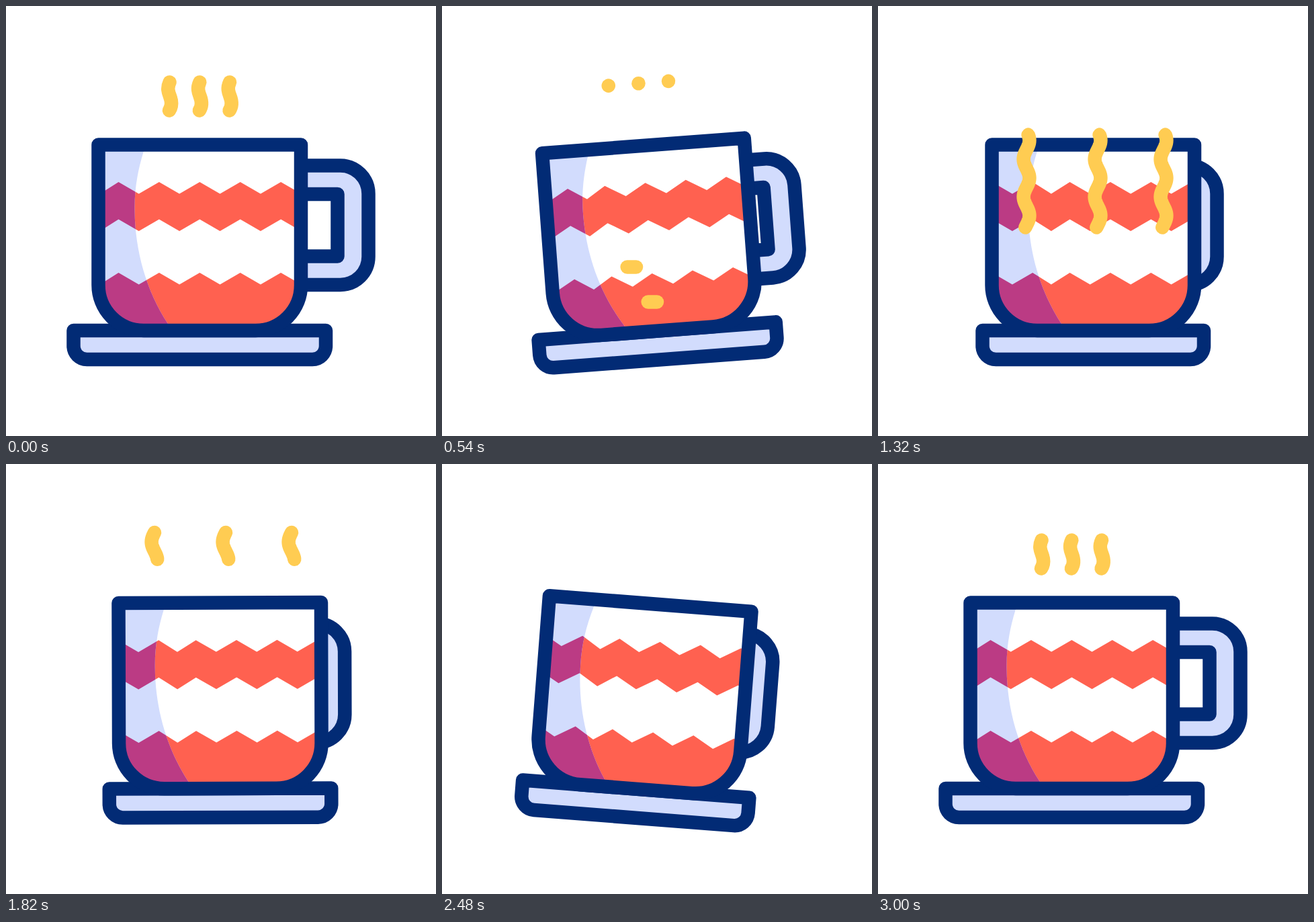
Write an HTML page that moves like this. It is 640 px wide and 640 px high and loops after 3400 ms.

```html
<!DOCTYPE html>
<html lang="en">
<head>
<meta charset="utf-8">
<title>Steaming cup</title>
<style>
  html, body { margin: 0; width: 100%; height: 100%; overflow: hidden; background: #fff; }
  svg { display: block; width: 100vw; height: 100vh; }
  .line { fill: none; stroke: #022b75; stroke-width: 20.5; stroke-linejoin: round; }
  .light { fill: #d2dcfd; }
  .glow { fill: none; stroke: #ffcc52; stroke-width: 20.5; stroke-linecap: round; }
</style>
</head>
<body>
<svg viewBox="0 0 640 640">
  <defs>
    <path id="cupShape" d="M137.5 206.5H439V415.5A67.5 67.5 0 0 1 371.5 483H205A67.5 67.5 0 0 1 137.5 415.5Z"/>
    <path id="shadeShape" d="M130 200H210L205 216C195 248 191 276 191.5 304C192 365 209 424 241 473L248 484H130Z"/>
    <path id="bands"/>
    <clipPath id="cupClip"><use href="#cupShape"/></clipPath>
    <clipPath id="shadeClip"><use href="#shadeShape"/></clipPath>
  </defs>
  <g id="cup">
    <path id="handle" class="line light" d="M420 237.5H497.5A42 42 0 0 1 539.5 279.5V373A42 42 0 0 1 497.5 415H420V372.5H493.5V280H420Z"/>
    <path id="saucer" class="line light"/>
    <use href="#cupShape" fill="#fff"/>
    <g clip-path="url(#cupClip)">
      <use class="band" href="#bands" fill="#ff6150"/>
      <use class="light" href="#shadeShape"/>
      <g clip-path="url(#shadeClip)"><use class="band" href="#bands" fill="#bb3b84"/></g>
    </g>
    <use href="#cupShape" class="line"/>
    <g id="puffs"></g>
  </g>
  <g id="streaks"></g>
  <g id="steam"></g>
</svg>
<script>
const LOOP = 3400;
const $ = id => document.getElementById(id);
const clamp = u => Math.min(1, Math.max(0, u));

// Smooth step from 0 to 1 between two times.
function ramp(t, from, to) {
  const u = clamp((t - from) / (to - from));
  return u * u * (3 - 2 * u);
}

// The second half starts with a lean back, then a lean forward.
const leanBack = t => ramp(t, 1775, 2160);
const leanForward = t => ramp(t, 2160, 2480);

const tilt = t =>
  4.3 * (ramp(t, 0, 260) - 2 * ramp(t, 260, 540) + ramp(t, 540, 900))
  - 4.05 * leanBack(t) + 8.5 * leanForward(t) - 4.45 * ramp(t, 2700, 3000);

const shift = t =>
  32 * ramp(t, 0, 900) - 42 * leanBack(t) + 22 * leanForward(t) - 12 * ramp(t, 2480, 3000);

// How far the cup is turned away: 0 to 1, a partial dip and rebound, then back to 0.
const turn = (t, start, dip, rebound) =>
  ramp(t, start, 860) - dip * leanBack(t) + rebound * leanForward(t)
  - (1 - dip + rebound) * ramp(t, 2480, 2820);

function addGlow(parent, d) {
  const path = document.createElementNS("http://www.w3.org/2000/svg", "path");
  path.setAttribute("class", "glow");
  path.setAttribute("d", d);
  path.setAttribute("pathLength", 1);
  $(parent).append(path);
  return path;
}

// Shows only the part of a path between two fractions of its length.
function trim(path, from, to) {
  path.style.display = to - from > 1e-5 ? "" : "none";
  path.setAttribute("stroke-dasharray", `${Math.max(0, to - from)} 9`);
  path.setAttribute("stroke-dashoffset", -from);
}

// Zigzag edge in two runs of even teeth that meet left of the front.
const peakX = i => 167.5 + 60.4 * i + (i < 0 ? 5 : 0);
function zigzag(top) {
  const points = [];
  for (let i = -4; i < 6; i++)
    points.push([peakX(i), top], [(peakX(i) + peakX(i + 1)) / 2, top + 17.5]);
  return points;
}
const band = (upper, lower) => "M" + upper.concat(lower.reverse()).join("L") + "Z";
$("bands").setAttribute("d", band(zigzag(262), zigzag(317.5)) + band(zigzag(397), zigzag(490)));

function wave(x) {
  const points = [];
  for (let y = 452; y >= 102; y -= 2)
    points.push([x - 4.4 * Math.sin((y - 102) / 56 * 2 * Math.PI), y]);
  return "M" + points.join("L");
}

const puffs = [243.5, 288.3, 333].map(x => addGlow("puffs",
  `M${x} 113.5c-4 8.5-2 14.5 .5 21c2.5 6.5 4 13.5-1 21`));
const streaks = [0, 1].map(i => addGlow("streaks", `M${43 + 31 * i} ${388.5 + 52 * i}h246`));
const steam = [221, 327, 425].map(x => addGlow("steam", wave(x)));

function draw(t) {
  const angle = tilt(t), sag = Math.abs(angle);
  $("cup").setAttribute("transform", `translate(${shift(t)} ${sag * 0.25}) rotate(${angle} 288 335)`);
  $("handle").setAttribute("transform", `translate(${-67 * turn(t, 250, 0.52, 0.46)} ${sag * 0.45})`);

  const slide = 86 * turn(t, 0, 0.3, 0.22);
  for (const el of document.querySelectorAll(".band"))
    el.setAttribute("transform", `translate(${slide} 0)`);

  const inset = 23 * turn(t, 250, 0.55, 0.36);
  const left = 100.5 + inset, right = 476 - inset;
  $("saucer").setAttribute("d", `M${left} 483H${right}V506a20 20 0 0 1-20 20H${left + 20}a20 20 0 0 1-20-20Z`);

  for (const p of puffs)
    if (t < LOOP / 2) trim(p, 0, 1 - ramp(t, 0, 560));
    else trim(p, 1 - ramp(t, 2500, 3000), 1);
  for (const s of streaks) trim(s, ramp(t, 304, 580), ramp(t, 150, 480));

  const remaining = (1 - clamp((t - 1115) / 1065)) ** 2;
  for (const s of steam) trim(s, 1 - remaining, ramp(t, 960, 1500));
}

function frame(now) {
  draw(now % LOOP);
  requestAnimationFrame(frame);
}
draw(0);
requestAnimationFrame(frame);
</script>
</body>
</html>
```
